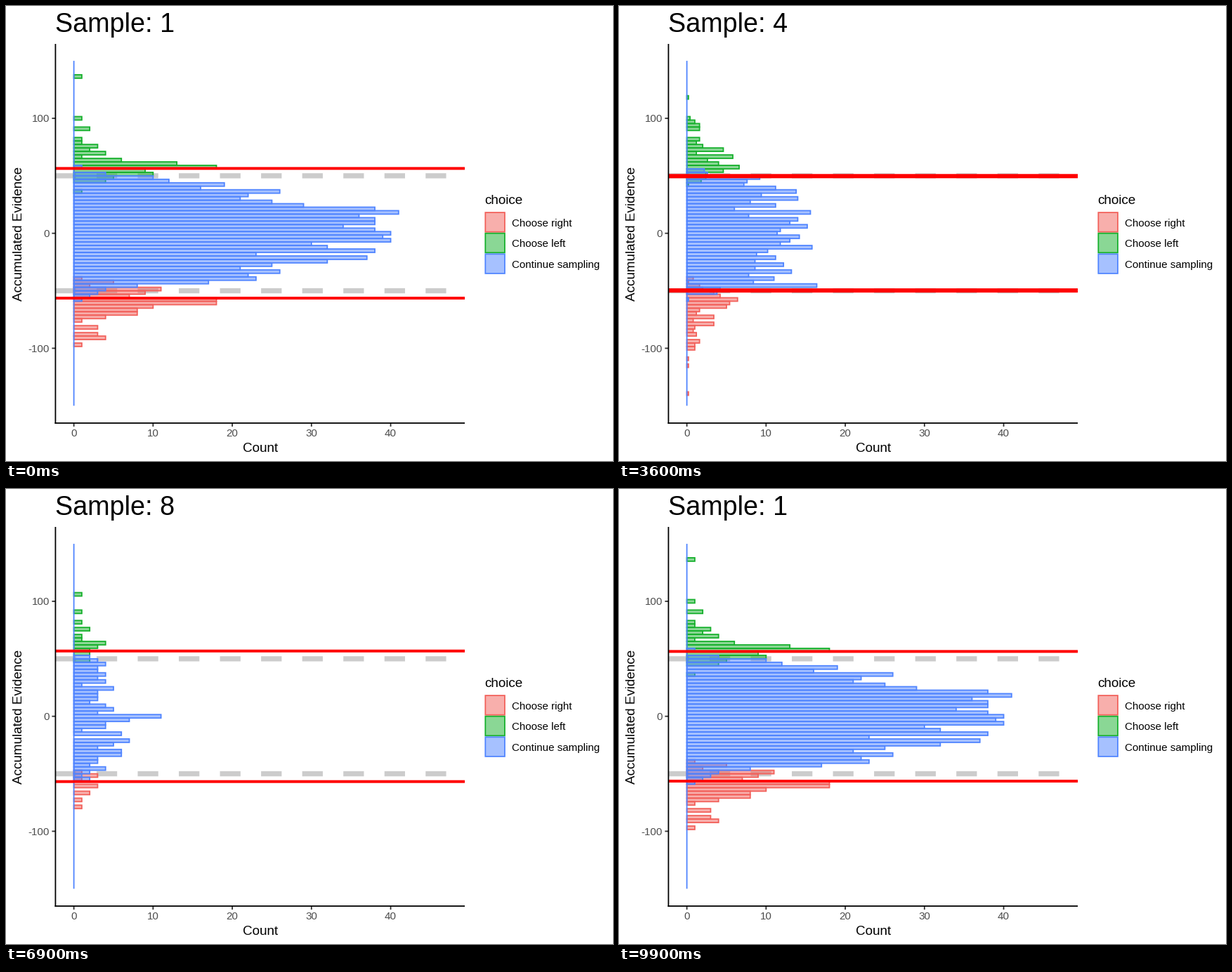
A matplotlib script for the animation above (10 s loop, 864 by 648 pixels).

```python
import numpy as np
import matplotlib
import matplotlib.pyplot as plt
from matplotlib.animation import FuncAnimation
from matplotlib.collections import PolyCollection
from matplotlib.colors import to_rgba
from matplotlib.patches import Rectangle

matplotlib.rcParams["font.family"] = "Liberation Sans"

W, H, DPI = 864, 648, 72          # at 72 dpi one point is one pixel
LEFT, RIGHT, TOP, BOTTOM = 70.4, 653, 54, 594
X0, UNIT_X = 96.6, 11.273
Y0, UNIT_Y = 323.7, 1.6375
LINE = 1.8
BIN = 300 / 99                    # 99 bins from -150 to 150
EVIDENCE = np.arange(-49, 50) * BIN

CHOICES = [("Choose right", "#F2605A"),
           ("Choose left", "#16B02C"),
           ("Continue sampling", "#4F84FF")]

SAMPLES = 10
HOLD, STEPS = 6, 5                # frames at rest, frames of motion


def px(count):
    return X0 + UNIT_X * np.asarray(count)


def py(evidence):
    return Y0 - UNIT_Y * np.asarray(evidence)


def simulate(n, rng):
    """Counts per bin (right, left, continue) for the n-th sample."""
    peak = 38 if n == 1 else 24 * 0.76 ** (n - 2)
    spread, tail = (32, 11) if n == 1 else (45, 20)
    dist = np.abs(EVIDENCE)
    undecided = 1 / (1 + np.exp((dist - 51) / 2.5))
    inner = peak * np.exp(-0.5 * (dist / spread) ** 2) * undecided
    outer = 0.5 * peak * np.exp((54 - dist) / tail) * (1 - undecided)
    mean = [outer * (EVIDENCE < 0), outer * (EVIDENCE > 0), inner]
    return np.minimum(rng.poisson(mean), 47)


rng = np.random.default_rng(12)
numbers = np.arange(1, SAMPLES + 1)
counts = [simulate(n, rng) for n in numbers]
bounds = np.interp(numbers, [1, 2, 3, SAMPLES], [56.4, 49.6, 47.5, 60.5])

# One sample per ten frames; the sixth rests one frame less
starts = HOLD + 10 * np.arange(SAMPLES) - (numbers > 5)


def state_at(frame):
    """Current sample, the next one, and how far between them."""
    i = np.searchsorted(starts, frame, side="right") - 1
    if i < 0:
        return 0, 1, 0.0
    step = min(frame - starts[i] + 1, STEPS)
    return i, (i + 1) % SAMPLES, step / STEPS


fig = plt.figure(figsize=(W / DPI, H / DPI), dpi=DPI, facecolor="white")
ax = fig.add_axes([0, 0, 1, 1])
ax.set_xlim(0, W)
ax.set_ylim(H, 0)
ax.axis("off")


def box(x, y, w, h, z, **style):
    return ax.add_patch(Rectangle((x, y), w, h, zorder=z, snap=False, **style))


def line(xs, ys, color, z=6):
    ax.plot(xs, ys, color=color, lw=LINE, zorder=z, snap=False,
            solid_capstyle="butt")


def label(x, y, text, size, color="black", **kw):
    kw.setdefault("va", "baseline")
    return ax.text(x, y, text, fontsize=size, color=color, zorder=7, **kw)


# Bars
def bar_shapes(row):
    used = row > 0
    right = px(row[used])
    left = np.full_like(right, X0)
    low = py(EVIDENCE[used] - BIN / 2)
    high = py(EVIDENCE[used] + BIN / 2)
    return np.stack([np.stack([left, right, right, left], axis=1),
                     np.stack([low, low, high, high], axis=1)], axis=2)


bars = []
for i, (_, color) in enumerate(CHOICES):
    shapes = PolyCollection([], edgecolors=color, facecolors=to_rgba(color, 0.5),
                            linewidths=LINE, joinstyle="miter", zorder=2 + i / 10)
    shapes.set_snap(False)
    bars.append(ax.add_collection(shapes))
line([X0, X0], py([-150, 150]), CHOICES[-1][1], 2.5)

# Fixed dashed bounds
DASH = 29.27
for level in (50, -50):
    for x in np.arange(LEFT, RIGHT - DASH, 2 * DASH):
        box(x, py(level) - DASH / 8, DASH, DASH / 4, 1, fc="#CCCCCC", lw=0)

# Moving bounds
limits = [box(LEFT, 0, RIGHT - LEFT, 4, 4, fc="#FF0000", lw=0) for _ in range(2)]

# Axes
line([LEFT, LEFT], [TOP, BOTTOM + LINE / 2], "black")
line([LEFT - LINE / 2, RIGHT], [BOTTOM, BOTTOM], "black")
for count in range(0, 50, 10):
    line([px(count)] * 2, [BOTTOM, BOTTOM + 5], "#333333", 5)
    label(px(count), 613.3, str(count), 15.1, "#4D4D4D", ha="center")
for level in (-100, 0, 100):
    line([LEFT - 5, LEFT], [py(level)] * 2, "#333333", 5)
    label(61.8, py(level) + 5.4, str(level), 15.1, "#4D4D4D", ha="right")
label((LEFT + RIGHT) / 2, 635, "Count", 18.9, ha="center")
label(27.5, (TOP + BOTTOM) / 2, "Accumulated Evidence", 18.9, rotation=90,
      ha="right", va="center")

# Legend
label(681, 281.5, "choice", 18.9)
for i, (name, color) in enumerate(CHOICES):
    mid = 307.9 + 29.6 * i
    box(682.3, mid - 13.8, 27.6, 27.6, 5, ec=color, lw=LINE, fc=to_rgba(color, 0.5))
    label(720, mid + 5.8, name, 15.1)

title = label(70.4, 37, "", 37.7)


def draw(frame):
    now, after, t = state_at(frame)
    mixed = (1 - t) * counts[now] + t * counts[after]
    for shapes, row in zip(bars, mixed):
        shapes.set_verts(bar_shapes(row))
    bound = (1 - t) * bounds[now] + t * bounds[after]
    thick = 6 if 0 < t < 1 else 4
    for patch, sign in zip(limits, (1, -1)):
        patch.set_y(py(sign * bound) - thick / 2)
        patch.set_height(thick)
    title.set_text(f"Sample: {numbers[now if t < 0.5 else after]}")
    return bars + limits + [title]


anim = FuncAnimation(fig, draw, frames=100, interval=100,
                     repeat=True, repeat_delay=0, blit=False)
plt.show()
```
